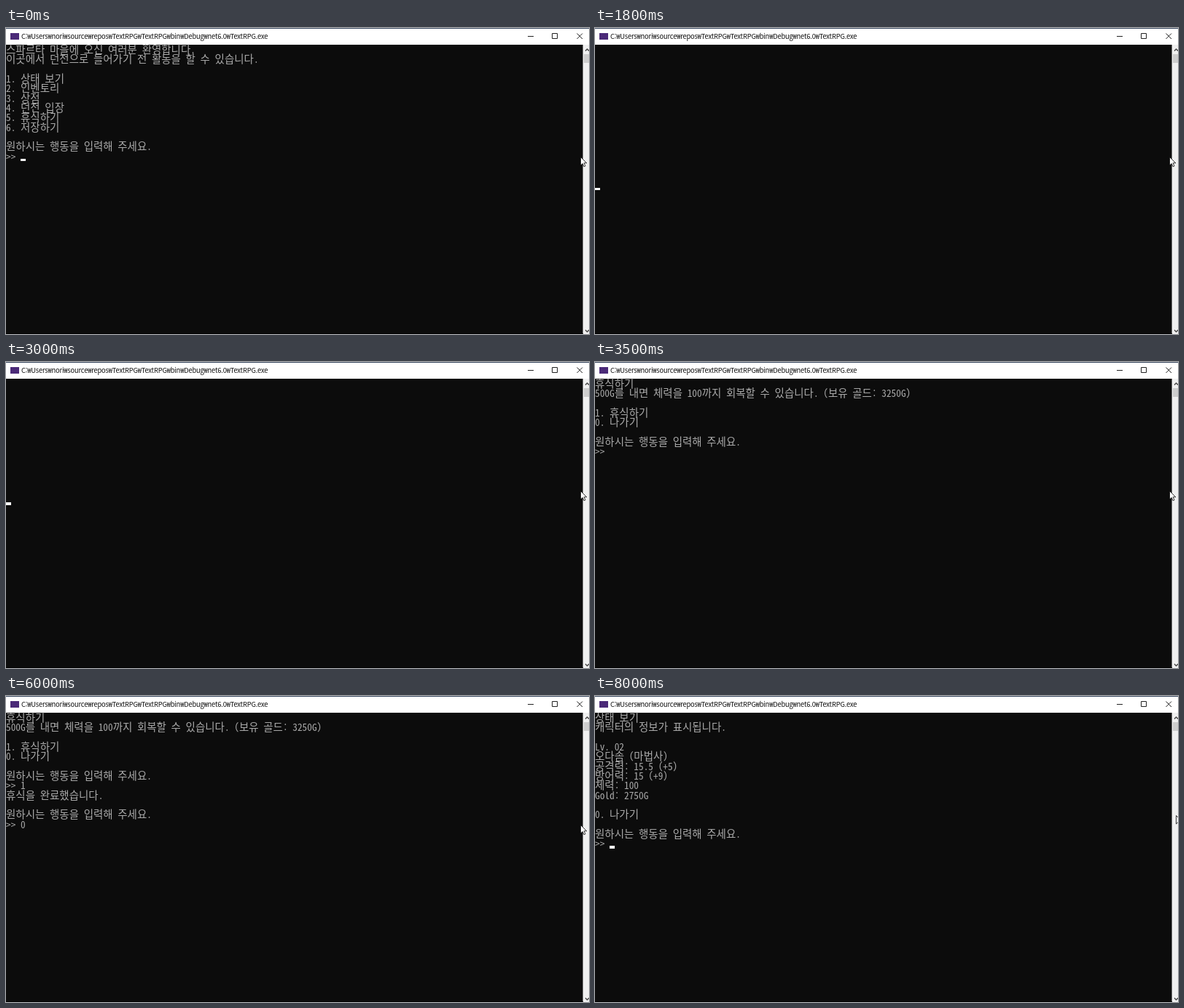
Recreate the animation shown at these times as an HTML page. Size 800 by 421 pixels, loop 8100 ms.

```html
<!DOCTYPE html>
<html lang="ko">
<head>
<meta charset="utf-8">
<style>
html, body { margin: 0; width: 100%; height: 100%; overflow: hidden; background: #0c0c0c; }
#stage { position: relative; width: 800px; height: 421px; overflow: hidden; background: #0c0c0c; }
#stage > * { position: absolute; }
svg { left: 0; top: 0; }
#title { left: 21px; top: 1px; font: 9.4px/21px "Noto Sans CJK KR", sans-serif; color: #111; letter-spacing: -.2px; white-space: pre; }
#text { left: 0; top: 23px; color: #aaa; font: 300 13.333px/13.333px "Noto Sans Mono CJK KR", "Noto Sans CJK KR", monospace; }
#text div { position: absolute; left: 0; height: 13.333px; white-space: pre; }
/* Hangul advances .92em, so this size fills two cells */
#text span { font-size: 14.493px; line-height: 0; }
#cursor { width: 6.67px; height: 3.6px; background: #fff; }
</style>
</head>
<body>
<div id="stage">
  <svg width="800" height="421" fill="none">
    <path fill="#fff" d="M0 0h800v23H0z"/>
    <path fill="#39475f" d="M0 0h800v1H0z"/>
    <path fill="#4b2a78" d="M6 7h12v9H6z"/>
    <path stroke="#222" d="M716 11.5h8M749.5 7.5h7v7h-7zM783.5 7.5l7.5 7.5m0-7.5l-7.5 7.5"/>
    <path fill="#f0f0f0" d="M791.6 23h8.4v398h-8.4z"/>
    <path fill="#cdcdcd" d="M793 36h7v12h-7z"/>
    <path stroke="#444" stroke-width="1.4" d="M795 31.5l2.5-2.5 2.5 2.5M795 415.5l2.5 2.5 2.5-2.5"/>
    <path fill="#000" d="M0 420h792v1H0z"/>
  </svg>
  <div id="title">C:₩Users₩nori₩source₩repos₩TextRPG₩TextRPG₩bin₩Debug₩net6.0₩TextRPG.exe</div>
  <div id="text"></div>
  <div id="cursor"></div>
  <svg width="800" height="421">
    <path id="mouse" fill="#fff" stroke="#000" stroke-width=".8" d="M0 0v11.5l2.7-2.5 1.9 4.2 1.9-.8-1.9-4.1h3.7z"/>
  </svg>
</div>
<script>
const LOOP = 8100, CELL = 20 / 3, ROW = 40 / 3, TOP = 23;
const $ = id => document.getElementById(id);
const ask = '원하시는 행동을 입력해 주세요.\n>> ';

const town = `스파르타 마을에 오신 여러분 환영합니다.
이곳에서 던전으로 들어가기 전 활동을 할 수 있습니다.

1. 상태 보기
2. 인벤토리
3. 상점
4. 던전 입장
5. 휴식하기
6. 저장하기

${ask}`;

const status = (hp, gold) => `상태 보기
캐릭터의 정보가 표시됩니다.

Lv. 02
오다솜 (마법사)
공격력: 15.5 (+5)
방어력: 15 (+9)
체력: ${hp}
Gold: ${gold}G

0. 나가기

${ask}`;

const inn = `휴식하기
500G를 내면 체력을 100까지 회복할 수 있습니다. (보유 골드: 3250G)

1. 휴식하기
0. 나가기

${ask}`;
const rested = inn + '1\n휴식을 완료했습니다.\n\n' + ask;

// A cleared console keeps the cursor on its old row.
const blank = row => '\n'.repeat(row);
const before = status(20, 3250), after = status(100, 2750);

// [start in ms, screen text, cursor visible]
const steps = [
  [0, town, 1], [400, town, 0], [500, town + '1', 1],
  [700, blank(12), 1], [800, before, 1], [1400, before, 0], [1600, before + '0', 1],
  [1800, blank(14), 1], [1900, town, 1], [2300, town, 0], [2500, town + '5', 1], [2800, town + '5', 0],
  [3000, blank(12), 1], [3100, inn, 1], [3500, inn, 0], [4000, inn, 1], [4300, inn + '1', 1],
  [4700, rested, 1], [5100, rested, 0], [5500, rested + '0', 1], [5800, rested + '0', 0],
  [6200, blank(12), 1], [6300, town, 1], [6700, town, 0], [6800, town + '1', 1],
  [7000, blank(12), 1], [7100, after, 1], [7400, after, 0], [7900, after, 1]
];

let shown;
function show(text) {
  if (text === shown) return;
  shown = text;
  const lines = text.split('\n');
  $('text').innerHTML = lines.map((line, row) => {
    const html = line.replaceAll('>', '&gt;').replace(/[가-힣]+/g, '<span>$&</span>');
    return `<div style="top:${row * ROW}px">${html}</div>`;
  }).join('');
  $('cursor').style.left = lines.at(-1).length * CELL + 'px';
  $('cursor').style.top = TOP + lines.length * ROW - 3.3 + 'px';
}

function draw(now) {
  const t = now % LOOP;
  const [, text, on] = steps.findLast(step => step[0] <= t);
  show(text);
  $('cursor').style.visibility = on ? 'visible' : 'hidden';
  const move = Math.min(3, Math.max(0, Math.floor(t / 100) - 77));
  $('mouse').setAttribute('transform', `translate(${788.5 + move * 3} ${177.5 - move * 13 / 3})`);
  requestAnimationFrame(draw);
}
draw(0);
</script>
</body>
</html>
```
